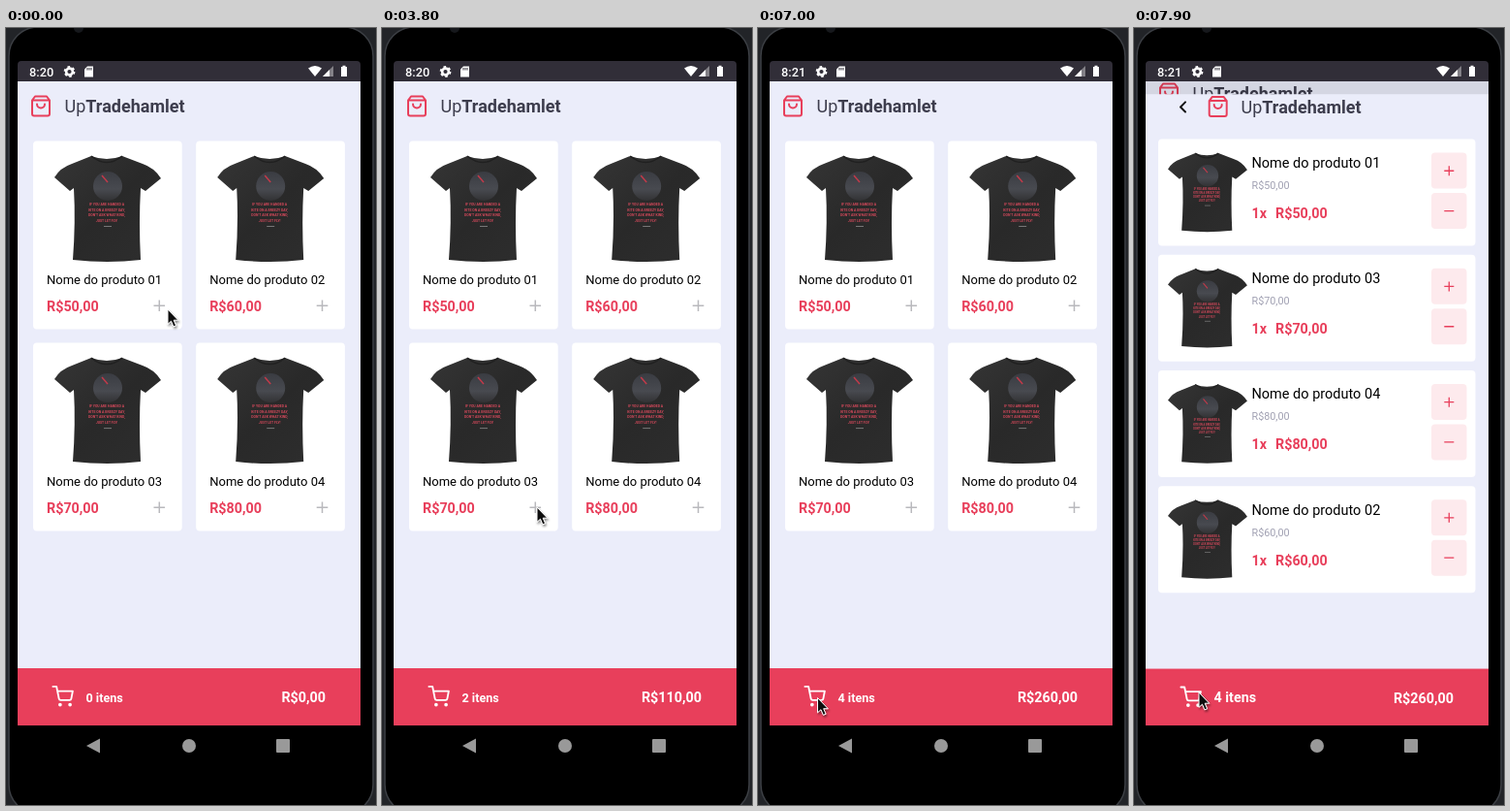
Write an HTML page that moves like this. It is 382 px wide and 801 px high and loops after 8 s.

```html
<!DOCTYPE html>
<html lang="pt-BR">
<head>
<meta charset="utf-8">
<style>
  html, body { margin: 0; width: 100%; height: 100%; overflow: hidden; background: #000; }
  svg { display: block; }
  text { font-family: Roboto, sans-serif; }
  .line { fill: none; stroke-width: 2; stroke-linecap: round; stroke-linejoin: round; }
  .brand { font-size: 18px; fill: #3d3d4d; }
  .bold { font-weight: 700; }
  .price { font-size: 14.35px; font-weight: 700; fill: #e83f5b; }
  .bar text { fill: #fff; font-weight: 700; font-size: 14.35px; }
  .print { font-size: 3.5px; font-weight: 700; fill: #d0485a; text-anchor: middle; }
</style>
</head>
<body>
<svg id="stage" width="382" height="801" viewBox="0 0 382 801"></svg>
<script>
const RED = '#e83f5b', PAGE = '#ebedfa';
const LOOP = 8000, STEP = 100, TOP = 55, HEIGHT = 664;
const prices = [50, 60, 70, 80];

const defs = `<defs>
  <linearGradient id="cloth" x2="1" y2="1">
    <stop stop-color="#353535"/><stop offset=".5" stop-color="#292929"/><stop offset="1" stop-color="#2e2e2e"/>
  </linearGradient>
  <linearGradient id="moon" x2="0" y2="1">
    <stop stop-color="#3a3c42"/><stop offset=".6" stop-color="#484a50"/><stop offset="1" stop-color="#323234"/>
  </linearGradient>
  <g id="shirt">
    <path fill="url(#cloth)" d="M38 2Q54 8 70 2L91 10Q103 14 110 25L94 38 89 35Q87 70 89 109Q55 113 19 109Q22 70 20 35L16 38 0 24Q6 14 18 10Z"/>
    <path d="M38 2Q54 15 70 2" fill="none" stroke="#202020" stroke-width="1.5"/>
    <circle cx="55" cy="33" r="15" fill="url(#moon)"/>
    <path d="M49 22l6 7" stroke="#c23a4a" stroke-width="1.5"/>
    <g class="print"><text x="54" y="53">IF YOU ARE HANDED A</text><text x="54" y="58.5">KITE ON A BREEZY DAY,</text>
    <text x="54" y="64">DON’T ASK WHAT KIND,</text><text x="54" y="69.5">JUST LET FLY!</text></g>
    <rect x="51" y="74" width="8" height="1" fill="#777"/>
  </g>
  <g id="bag" class="line" stroke="${RED}"><path d="M6 2L3 6v14a2 2 0 0 0 2 2h14a2 2 0 0 0 2-2V6l-3-4zM3 6h18M16 10a4 4 0 0 1-8 0"/></g>
  <g id="cart" class="line" stroke="#fff"><circle cx="9" cy="21" r="1"/><circle cx="20" cy="21" r="1"/>
    <path d="M1 1h4l2.7 13.4a2 2 0 0 0 2 1.6h9.7a2 2 0 0 0 2-1.6L23 6H6"/></g>
  <clipPath id="screen"><rect x="12" y="${TOP}" width="354" height="${HEIGHT}"/></clipPath>
  <clipPath id="reveal"><rect id="revealBox" x="12" width="354" height="${HEIGHT}"/></clipPath>
  <filter id="shadow" x="-50%" y="-50%" width="220%" height="220%"><feDropShadow dx="1" dy="2" stdDeviation="1.3" flood-opacity=".45"/></filter>
</defs>`;

const brand = (bagX, textX) => `<use href="#bag" x="${bagX}" y="68.5"/>
  <text class="brand" x="${textX}" y="87">Up<tspan class="bold">Tradehamlet</tspan></text>`;

const bar = (id, size) => `<g class="bar"><rect x="12" y="660" width="354" height="59" fill="${RED}"/>
  <g id="${id}Button"><use href="#cart" transform="translate(47.5 678) scale(.93)"/>
  <text id="${id}Count" x="82.5" y="694.5" style="font-size:${size}px"></text></g>
  <text id="${id}Total" x="330" y="695" text-anchor="end"></text></g>`;

const product = (price, i) => `<g transform="translate(${28 + i % 2 * 168.2} ${116.5 + (i >> 1) * 208.1})">
  <rect width="153.7" height="194" rx="4" fill="#fff"/>
  <use href="#shirt" x="22" y="13.5"/>
  <text x="14" y="147.5" font-size="13">Nome do produto 0${i + 1}</text>
  <text class="price" x="14" y="175.5">R$${price},00</text>
  <path id="plus${i}" d="M124.5 169.7h11.6M130.3 163.9v11.6" stroke="#b9b9bd" stroke-width="1.5"/></g>`;

const cartRow = (i, row) => `<g transform="translate(25 ${114 + row * 119.2})">
  <rect width="327.5" height="110" rx="4" fill="#fff"/>
  <use href="#shirt" transform="translate(10 13) scale(.745)"/>
  <text x="96.5" y="29.5" font-size="14.5">Nome do produto 0${i + 1}</text>
  <text x="96.5" y="51.5" font-size="10.8" fill="#a0a0b2">R$${prices[i]},00</text>
  <text class="price" x="96.5" y="81.5">1x</text><text class="price" x="121" y="81.5">R$${prices[i]},00</text>
  <g fill="#fdeaed"><rect x="282" y="14" width="36.5" height="37" rx="4"/><rect x="282" y="55.5" width="36.5" height="37" rx="4"/></g>
  <path d="M295.3 32.7h10M300.3 27.7v10M295.3 74h10" stroke="${RED}" stroke-width="1.3"/></g>`;

const phone = `<rect width="382" height="801" fill="#222428"/>
  <rect x="3" y="-1" width="376" height="811" rx="30" fill="#000" stroke="#3c3f44" stroke-width="1.5"/>
  <circle cx="75" cy="0" r="5" fill="#16181c"/>
  <path d="M12 55V38q0-4 4-4H362q4 0 4 4V55z" fill="#312e38"/>
  <g fill="#fff">
    <text id="clock" x="24" y="49.5" font-size="12.8" font-weight="500"></text>
    <circle cx="65.5" cy="45" r="3.4" fill="none" stroke="#fff" stroke-width="2.6"/>
    <circle cx="65.5" cy="45" r="5" fill="none" stroke="#fff" stroke-width="1.8" stroke-dasharray="2.6 2.636"/>
    <path d="M84 39.5h6v11h-9v-8z"/><path d="M84 41v2.5M86 41v2.5M88 41v2.5" stroke="#312e38"/>
    <path d="M312 41.5q7-5 14 0l-7 8.5z"/>
    <path d="M338 39v11h-11z" opacity=".4"/><path d="M334 43v7h-7z"/>
    <path d="M346 40h1.5v-1.2h3V40h1.5v10h-6z"/>
  </g>
  <g fill="#999"><path d="M83 740l14-7.5v15z"/><circle cx="189" cy="740" r="7"/><rect x="279" y="733" width="14" height="14" rx="1"/></g>`;

document.getElementById('stage').innerHTML = `${defs}${phone}
  <g clip-path="url(#screen)">
    <rect x="12" y="${TOP}" width="354" height="${HEIGHT}" fill="${PAGE}"/>
    <g id="home">${brand(24, 60.5)}${prices.map(product).join('')}${bar('home', 12.6)}</g>
    <rect id="shade" x="12" y="${TOP}" width="354" height="${HEIGHT}"/>
    <g id="checkout" clip-path="url(#reveal)">
      <rect x="12" y="${TOP}" width="354" height="${HEIGHT}" fill="${PAGE}"/>
      <g id="checkoutBody"><path class="line" d="M53 75.8l-5 5.1 5 5.1" stroke="#111"/>
        ${brand(74.7, 110.5)}${[0, 2, 3, 1].map(cartRow).join('')}${bar('checkout', 14.35)}</g>
    </g>
  </g>
  <path id="cursor" filter="url(#shadow)" d="M0 0V15.3L3.5 12.2 5.9 17.8 8.6 16.7 6.2 11.2H10.8Z" fill="#111" stroke="#fff"/>`;

const el = {};
document.querySelectorAll('[id]').forEach(node => el[node.id] = node);

// time, x, y of the pointer tip
const path = [
  [0, 167, 290], [200, 161, 290], [1200, 161, 291], [1300, 168, 292], [1500, 240, 297], [1700, 306, 298], [1900, 322, 293],
  [2900, 322, 293], [3000, 317, 300], [3500, 170, 480], [3600, 152, 492], [3800, 160, 494],
  [4500, 160, 494], [4600, 167, 496], [4900, 250, 500], [5200, 318, 499], [5300, 322, 497],
  [6000, 322, 497], [6100, 305, 513], [6300, 198, 594], [6600, 80, 688], [6800, 56, 696],
  [6900, 56, 696], [7100, 67, 685]
];
// product, press time, release time
const taps = [[0, 400, 700], [1, 2100, 2300], [2, 3900, 4100], [3, 5500, 5700]];
const slide = [.057, .782, .935, .98];

function pointer(t) {
  const next = path.findIndex(key => key[0] > t);
  if (next < 0) return path[path.length - 1].slice(1);
  const [a, b] = [path[next - 1], path[next]];
  const k = (t - a[0]) / (b[0] - a[0]);
  return [1, 2].map(axis => a[axis] + (b[axis] - a[axis]) * k);
}

function draw(t) {
  let count = 0, total = 0;
  for (const [i, press, release] of taps) {
    const held = t >= press && t < release;
    el['plus' + i].setAttribute('opacity', held ? .2 : t === release ? .6 : 1);
    if (t >= release) { count++; total += prices[i]; }
  }
  for (const id of ['home', 'checkout']) {
    el[id + 'Count'].textContent = `${count} itens`;
    el[id + 'Total'].textContent = `R$${total},00`;
  }
  el.clock.textContent = t < 6600 ? '8:20' : '8:21';
  el.homeButton.setAttribute('opacity', t >= 7300 ? .25 : 1);

  const p = t < 7600 ? 0 : slide[(t - 7600) / STEP];
  const rest = HEIGHT * (1 - p);
  el.home.setAttribute('transform', `translate(0 ${-.02 * HEIGHT * p})`);
  el.shade.setAttribute('opacity', .1 * p);
  el.checkout.setAttribute('visibility', p ? 'visible' : 'hidden');
  el.revealBox.setAttribute('y', TOP + rest);
  el.checkoutBody.setAttribute('transform', `translate(0 ${.041 * rest})`);
  el.cursor.setAttribute('transform', `translate(${pointer(t)})`);
}

const start = performance.now();
function tick() {
  draw(Math.floor((performance.now() - start) % LOOP / STEP) * STEP);
  requestAnimationFrame(tick);
}
tick();
</script>
</body>
</html>
```
